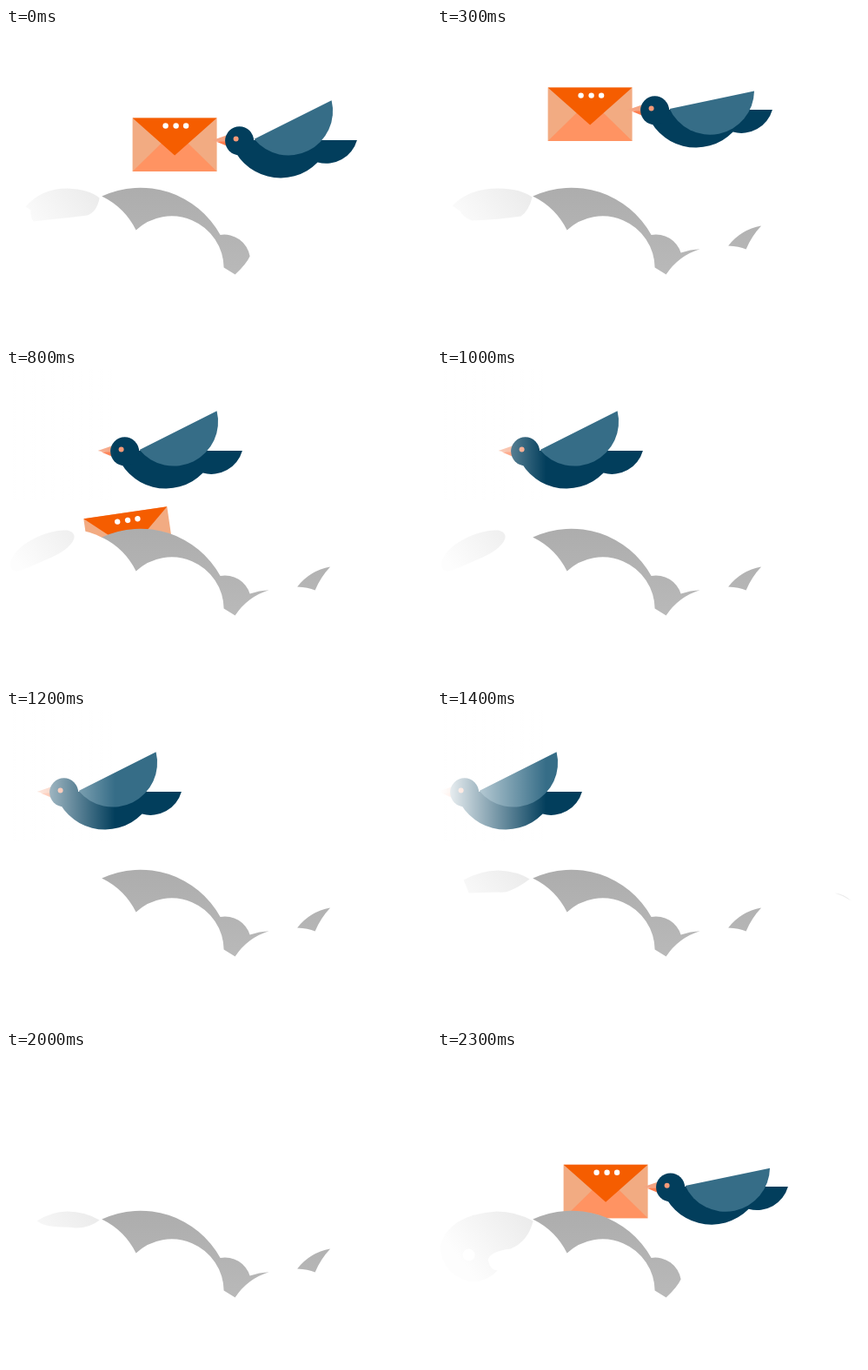
These frames come from a looping animation (489 px wide and 360 px high, 2400 ms). An HTML page with a canvas:

```html
<!DOCTYPE html>
<html>
<head>
<meta charset="utf-8">
<style>
html, body { margin: 0; width: 100%; height: 100%; overflow: hidden; background: #fff; }
canvas { display: block; }
</style>
</head>
<body>
<canvas id="stage" width="489" height="360"></canvas>
<script>
const c = document.getElementById('stage').getContext('2d');
const STEP = 100, STEPS = 24;
const NAVY = '#023e5c';

function gradient(x0, y0, x1, y1, from, to) {
  const g = c.createLinearGradient(x0, y0, x1, y1);
  g.addColorStop(0, from);
  g.addColorStop(1, to);
  return g;
}

const GRAY = gradient(0, 184, 0, 283, '#adadad', '#b9b9b9');
const PALE = gradient(102, 184, 28, 242, '#ebebeb', '#fdfdfd');
const FADE = gradient(3, 0, 125, 0, '#fff', '#fff0');

function fill(color, path) {
  c.fillStyle = color;
  c.fill(new Path2D(path));
}

function disc(color, x, y, r) {
  c.fillStyle = color;
  c.beginPath();
  c.arc(x, y, r, 0, 7);
  c.fill();
}

function placed(x, y, angle, draw) {
  c.save();
  c.translate(x, y);
  c.rotate(angle * Math.PI / 180);
  draw();
  c.restore();
}

function envelope() {
  fill('#f2ab82', 'M-48.5-31h97v61.5h-97z');
  fill('#ff9362', 'M-48.5 30.5L0-17 48.5 30.5z');
  fill('#f55d00', 'M-48.5-31h97L0 12z');
  for (const x of [-10.5, 1.5, 13]) disc('#fff', x, -22, 3.2);
}

function bird(wingAngle) {
  fill('#f5a482', 'M-31-.5L-15-6V3z');
  fill('#ff7d4d', 'M-27 1L-15 1V6z');
  fill(NAVY, 'M-10.5-.6A60 60 0 0 0 90 25A37 37 0 0 0 135.3-.6z');
  disc(NAVY, 0, .2, 16.5);
  disc('#f79a78', -4, -2, 3);
  placed(17, -1.7, wingAngle, () => fill('#366d87', 'M0 0H99.5A51 51 0 0 1 0 0z'));
}

// Ease-in, then a Hermite blend into a constant glide
function birdX(n) {
  if (n < 3) return 268 - 2 * n * n;
  if (n >= 8) return 136 - 17.5 * (n - 8);
  const u = (n - 3) / 5, u2 = u * u, u3 = u2 * u;
  return 250 * (2 * u3 - 3 * u2 + 1) - 60 * (u3 - 2 * u2 + u)
       + 136 * (3 * u2 - 2 * u3) - 87.5 * (u3 - u2);
}

function flyers(n) {
  const rise = n > 19 ? n - STEPS : n;
  const x = birdX(Math.max(rise, 0));
  const y = 94 + 3.88 * Math.min(rise - 3, 0) ** 2;
  const drop = Math.max(rise - 5, 0);
  if (drop < 6) {
    const ex = drop ? birdX(5) - 74.5 + 2 * drop : x - 74.5;
    placed(ex, y + 5 + 10.7 * drop * drop, -2.75 * drop, envelope);
  }
  if (n !== 19) placed(x, y, 0, () => bird(n % 2 ? -11.8 : -26.6));
  if (n > 7 && n < 20) fill(FADE, 'M-1-1H130V150H-1z');
}

// Visible part of the pale cloud, from the given step on
const pale = [
  [0, 'M22 205Q40 184 70 184Q95 185 107 195Q104 211 93 215Q70 218 48 220L31 222Q27 217 28 209z'],
  [2, 'M17 204Q36 184 70 184Q95 184 109 194Q105 210 96 216Q70 220 40 221Q30 218 26 210z'],
  [7, 'M5 227C1 206 44 183 70 185C87 189 75 206 52 216Q25 228 14 232Q6 233 5 227z'],
  [11, ''],
  [14, 'M30 195Q50 184 70 184Q92 185 106 194Q94 203 84 207Q78 210 70 209L36 210z'],
  [18, 'M35 195Q52 184 70 184Q90 184 107 194Q96 203 80 203Q72 202 64 202Q44 202 35 195z'],
  [21, 'M3 224Q12 188 68 184Q90 184 110 195Q104 219 84 227Q60 230 58 240Q61 252 69 252Q56 266 37 265Q5 256 3 224z']
];

function clouds(n) {
  for (const [x, y, r] of [[70, 269, 85.5], [155, 289, 105], [250, 267, 30],
    [315, 311, 58], [375, 273, 46], [433, 297, 90]]) disc('#fff', x, y, r);
  fill('#fff', 'M-1 255H489V360H-1z');

  fill(PALE, pale.filter(p => p[0] <= n).pop()[1]);
  if (n > 20) disc('#fff', 36, 234, 7);

  const full = n > 1 && n < 22;
  const edge = full ? 'A30 30 0 0 1 280 258Q291 254 302 253.7A72 72 0 0 0 263 283'
                    : 'A30 30 0 0 1 280 262Q276 271 263 283';
  fill(GRAY, 'M109.6 193A105 105 0 0 1 246 237.3' + edge +
    'L250 275A60 60 0 0 0 149 232A86 86 0 0 0 109.6 193z');
  if (full) fill(GRAY, 'M334.5 250A62 62 0 0 1 372.5 227A90 90 0 0 0 355 254Q347 250.5 334.5 250z');
  if (n > 13 && n < 19) fill('#ebebeb', 'M457 210Q468 211 476 219Q467 213 457 210z');
}

function frame(now) {
  const n = Math.floor(now / STEP) % STEPS;
  c.clearRect(-1, -1, 490, 361);
  flyers(n);
  clouds(n);
  requestAnimationFrame(() => frame(performance.now() - start));
}

c.translate(.6, .6);
const start = performance.now();
frame(0);
</script>
</body>
</html>
```
